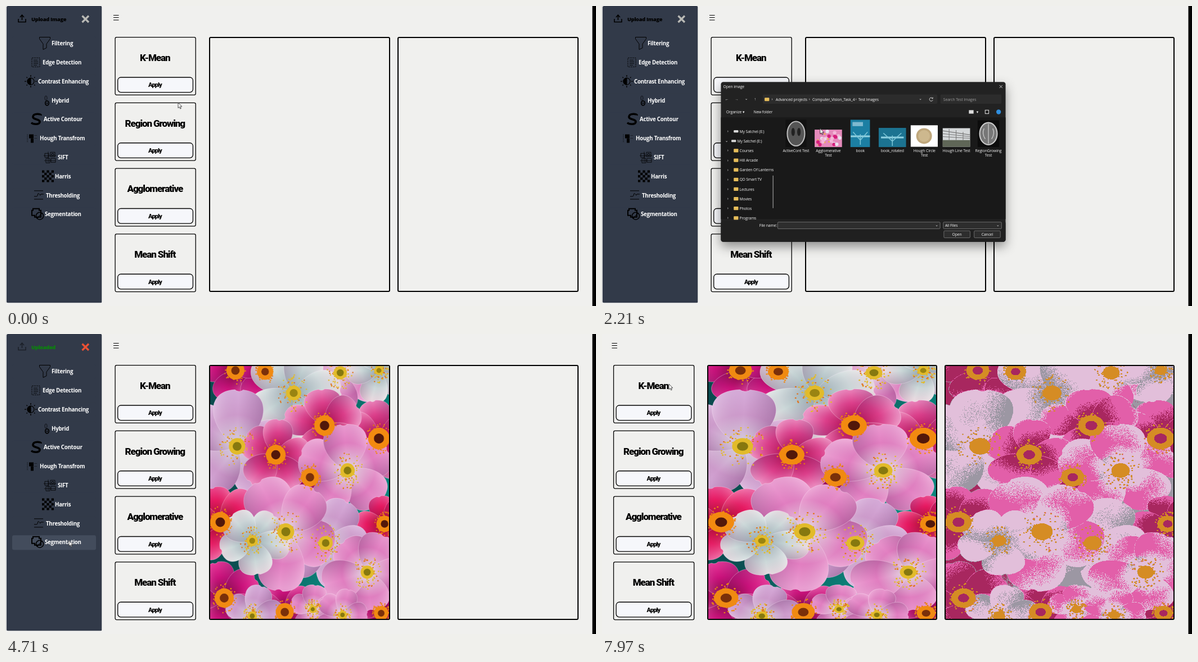
Write an HTML page with a canvas that moves like this. It is 1049 by 534 pixels and loops after 8 s.

```html
<!DOCTYPE html>
<html lang="en">
<head>
<meta charset="utf-8">
<title>Image segmentation</title>
<style>
html, body { margin: 0; width: 100%; height: 100%; overflow: hidden; background: #f0f0ee; }
#stage { position: relative; width: 1049px; height: 534px; overflow: hidden; background: #f0f0ee; }
#stage > svg { position: absolute; left: 0; top: 0; }
.panel { position: absolute; top: 55px; height: 454px; box-sizing: border-box; border: 2px solid #000; border-radius: 3px; overflow: hidden; }
.panel canvas { display: block; width: 100%; height: 100%; }
text { white-space: pre; }
.nav { font: 700 9.7px "Open Sans", "Noto Sans", sans-serif; letter-spacing: -.25px; fill: #fff; }
.up { font: 800 9.3px "Open Sans", "Noto Sans", sans-serif; letter-spacing: -.3px; }
.title { font: 900 17px Roboto, sans-serif; letter-spacing: -1.1px; }
.apply { font: 900 11px Roboto, sans-serif; letter-spacing: -.9px; }
.dlg { font: 400 6.6px "Open Sans", "Noto Sans", sans-serif; letter-spacing: -.12px; fill: #f4f4f4; }
.dim { fill: #9a9a9a; }
.mid { text-anchor: middle; }
.line { fill: none; stroke: #000; }
</style>
</head>
<body>
<div id="stage">
  <svg id="ui" width="1049" height="534"></svg>
  <div class="panel" id="left"><canvas id="photo" width="405" height="450"></canvas></div>
  <div class="panel" id="right"><canvas id="result" width="405" height="450"></canvas></div>
  <svg id="top" width="1049" height="534"></svg>
</div>
<script>
const $ = id => document.getElementById(id);
const clamp = v => Math.max(0, Math.min(1, v));
const span = (t, a, b) => clamp((t - a) / (b - a));
const show = (id, on) => { $(id).style.display = on ? '' : 'none'; };

const text = (x, y, s, cls) => `<text x="${x}" y="${y}" class="${cls}">${s}</text>`;
const rect = (x, y, w, h, fill, more = '') =>
  `<rect x="${x}" y="${y}" width="${w}" height="${h}" fill="${fill}" ${more}/>`;
const oval = (x, y, rx, ry, fill, more = '') =>
  `<ellipse cx="${x}" cy="${y}" rx="${rx}" ry="${ry}" fill="${fill}" ${more}/>`;
const path = (d, more = '') => `<path d="${d}" class="line" ${more}/>`;

function seeded(seed) {
  return () => {
    seed = (seed + 0x6D2B79F5) | 0;
    let v = Math.imul(seed ^ (seed >>> 15), 1 | seed);
    v = (v + Math.imul(v ^ (v >>> 7), 61 | v)) ^ v;
    return ((v ^ (v >>> 14)) >>> 0) / 4294967296;
  };
}

// ---- sidebar, menu and cards ----
const items = [
  // label, icon x, text x, icon
  ['Filtering', 69, 81, path('M-9.5-11H9.5V-8L3 1V8L-3 11V1L-9.5-8Z')],
  ['Edge Detection', 53, 65, path('M-7-8H7V8H-7Z', 'stroke-dasharray="3 1" stroke-width=".8"') +
    path('M-4-4H3M-4-1H4M-4 2H4M-4 5H2', 'stroke-width=".8"')],
  ['Contrast Enhancing', 44, 57, path('M0-6A6 6 0 0 1 0 6A6 6 0 0 1 0-6', 'stroke-width="1.2"') +
    path('M0-6A6 6 0 0 0 0 6Z', 'style="fill:#000"') +
    path('M0-11V-8M0 8V11M-11 0H-8M8 0H11M-7.5-7.5L-6-6M6 6L7.5 7.5M7.5-7.5L6-6M-6 6L-7.5 7.5', 'stroke-width="1.4"')],
  ['Hybrid', 72, 81, oval(1, 5, 3.2, 4, 'none', 'stroke="#000" stroke-width="1.8"') +
    oval(-1, -4, 2, 4, 'none', 'stroke="#000" stroke-width=".7"') + oval(1, 5, 1, 1.5, '#000')],
  ['Active Contour', 54, 67, path('M8-7C9-10-5-11-6-5C-7 1 7-1 6 5C5 10-6 9-9 6', 'stroke-width="3.6"')],
  ['Hough Transfrom', 45, 60, rect(-4, -7, 8, 7, '#000') + rect(-1, 0, 5, 8, '#000') +
    path('M-7-7V7M6-5H11M6 0H11', 'stroke-dasharray="1 1.5"')],
  ['SIFT', 78, 92, path('M-9-7H-2V0H-9ZM1-9H9V-1H1ZM-7 2H0V10H-7ZM2 2H10V9H2Z', 'stroke-width=".8"') +
    path('M-11-3H11M-10 6H10M-3-10V9', 'stroke-width=".7"') + oval(5, -5, 2, 2, 'none', 'stroke="#000"')],
  ['Harris', 75, 87, path('M-11-8.4H10M-11 0H10M-11 8.4H10', 'stroke-width="4.2" stroke-dasharray="4.2"') +
    path('M-6.8-4.2H10M-6.8 4.2H10', 'stroke-width="4.2" stroke-dasharray="4.2"')],
  ['Thresholding', 58, 71, path('M-8-8H8M-8 7H8M-8 2H-4C0 2-3-4 0-3S2 3 4-2H9')],
  ['Segmentation', 56, 69, path('M-8-10H3V-7H6V5H-5V2H-10V-7H-8Z', 'stroke-width="2"') +
    oval(4, 3, 6.5, 6.5, 'none', 'stroke="#000" stroke-width="1.6"') + path('M-1 8L8-2', 'stroke-width="1.2"')],
];
const itemY = i => 66.5 + 33.8 * i;

const sidebar = `<svg id="side" x="1" y="0" width="169.5" height="528.5">
  <rect width="100%" height="528.5" rx="2.5" fill="#323a49"/><g id="sideIn">
  <g id="upIcon">${path('M22 23V28.5H35V23M28.5 25V16.5M25 20L28.5 16L32 20', 'stroke-width="1.6"')}</g>
  ${text(45, 27, 'Upload Image', 'up" id="upText')}
  <path id="close" d="M135.5 17.5L147 29M147 17.5L135.5 29" stroke-width="3.2"/>
  ${items.map(([label, ix, tx, icon], i) =>
    `<rect class="hov" x="11" y="${itemY(i) - 12.5}" width="149" height="26" rx="3" fill="#323a49"/>
     <g transform="translate(${ix} ${itemY(i)})">${icon}</g>${text(tx, itemY(i) + 3.6, label, 'nav')}`).join('')}
  </g></svg>`;

const cards = ['K-Mean', 'Region Growing', 'Agglomerative', 'Mean Shift'].map((name, i) =>
  `<g transform="translate(194 ${55.5 + 116.75 * i})">
    ${rect(.1, .2, 143.1, 102.6, 'none', 'rx="2.5" stroke="#000" stroke-width="1.3"')}
    ${text(70.8, 42.4, name, 'title mid')}
    ${rect(4.7, 71.5, 133.7, 26.6, '#f6f7fb', `rx="5.5" stroke="#000" stroke-width="1.3" id="btn${i}"`)}
    ${text(71, 88.9, 'Apply', 'apply mid')}</g>`).join('');

$('ui').innerHTML = sidebar + `<g id="content">
  ${rect(184, 10, 24, 22, '#9ca5b1', 'rx="3" id="menuBg"')}
  ${rect(190, 15, 11.5, 12, '#d2cd3c', 'rx="2" id="menuFill"')}
  ${path('M191 16.5H200.5M191 20.5H200.5M191 25H200.5', 'stroke-width="1.1"')}
  ${cards}</g>` + rect(1042.5, 0, 7, 534, '#000');

// ---- file dialog ----
const folder = (x, y) => rect(x, y - 3, 8, 6, '#e6bd5a', 'rx="1"');
const rows = ['My Satchel (E:)', 'My Satchel (E:)', 'Courses', 'Hill Arcade', 'Garden Of Lanterns', 'QD Smart TV',
  'Lectures', 'Movies', 'Photos', 'Programs'];
const tree = rows.map((name, i) => {
  const y = 225 + 16.55 * i, x = i == 1 ? 248 : 252;
  const icon = i < 2 ? rect(x - 10, y - 2, 8, 4, '#d8d8d8', 'rx="1"') : folder(x - 10, y);
  return text(x - 21, y + 2, i == 1 ? '⌄' : '›', 'dlg') + icon + text(x, y + 2.5, name, 'dlg');
}).join('');

const rnd = seeded(4);
let blossoms = rect(381, 222, 47, 30, '#e58abb');
for (let i = 0; i < 26; i++) {
  const c = ['#f4b8d8', '#d61f7c', '#e9e2ee', '#eab03c'][i % 4], r = i % 4 == 3 ? 1.4 : 3;
  blossoms += oval(384 + rnd() * 41, 225 + rnd() * 24, r, r, c);
}
const stems = (x, y, w) => rect(x, y, w, 3, '#8fd0e0') +
  path(`M${x + w / 2} ${y + 16}V${y - 2}M${x + w / 2} ${y + 8}L${x + 4} ${y - 6}M${x + w / 2} ${y + 8}L${x + w - 4} ${y - 6}`,
    'style="stroke:#7cc6d8;stroke-width:1.5"');
const thumbs = [
  [349, ['ActiveCont Test'], rect(331, 205, 36, 47, '#111') +
    oval(349, 229, 15, 21, '#555', 'stroke="#bbb" stroke-width="2"') + oval(344, 226, 3, 7, '#222') + oval(354, 226, 3, 7, '#222')],
  [404.5, ['Agglomerative', 'Test'], blossoms],
  [459.5, ['book'], rect(442.5, 205, 33.5, 47, '#1c7fa3') + rect(446, 209, 18, 7, '#7fb9cf') + stems(443, 232, 33)],
  [514.5, ['book_rotated'], rect(491, 219, 47, 33, '#1c7391') + stems(495, 234, 39)],
  [569.5, ['Hough Circle', 'Test'], rect(546, 214.5, 46.5, 37, '#fff') + oval(569, 233, 13.5, 13.5, '#bfa77c') +
    oval(569, 233, 10, 10, '#cdb88e')],
  [624.5, ['Hough Line Test'], rect(601, 219.5, 47, 32, '#d5d8da') + rect(601, 240, 47, 11.5, '#5f6657') +
    path('M601 224L648 231M601 229L648 234M601 234L648 237M612 221V240M624 223V240M636 226V240', 'style="stroke:#777"')],
  [679.5, ['RegionGrowing', 'Test'], rect(661, 206, 37, 46, '#0c0c0c') +
    oval(679.5, 229, 15, 19, '#777', 'stroke="#ccc" stroke-width="2"') +
    path('M679.5 212V246M672 220Q668 229 674 238M687 220Q691 229 685 238', 'style="stroke:#ddd"')],
].map(([x, names, art]) => art + names.map((s, i) => text(x, 260.5 + 8 * i, s, 'dlg mid')).join('')).join('');

const field = (x, y, w, h) => rect(x, y, w, h, '#2d2d2d', 'rx="1.5" stroke="#858585" stroke-width=".7"');
const white = (x, y, w, h) => rect(x, y, w, h, '#fff');

$('top').innerHTML = `<defs><filter id="shade" x="-20%" y="-20%" width="140%" height="150%">
  <feDropShadow dx="0" dy="8" stdDeviation="9" flood-opacity=".42"/></filter></defs>
<g id="dialog">
  <g filter="url(#shade)">${rect(220, 140, 489, 275, '#202020', 'rx="4"')}</g>
  <g id="blank">
    ${white(220, 155.5, 489, 220.5)}${rect(222, 200.3, 93, 176, '#1c1c1c')}${rect(220, 376, 489, 36, '#303030')}
    ${white(287, 382, 28, 8)}${white(317.5, 380, 279.5, 13)}${white(603, 380, 98, 13)}
    ${white(603, 395.5, 46, 13)}${white(655, 395.5, 46, 13)}${white(701, 407, 8, 7)}
    ${rect(225, 145, 7, 5.5, '#eee')}${text(235, 150.5, 'Open image', 'dlg')}
  </g>
  <g id="files">
    ${text(224, 150.5, 'Open image', 'dlg')}
    ${rect(220, 201, 489, 175, '#191919')}
    ${rect(292, 161.5, 300, 16, '#2c2c2c', 'rx="2"')}${rect(597, 161.5, 105, 16, '#2c2c2c', 'rx="2"')}
    ${text(227, 172, '←', 'dlg')}${text(244, 172, '→', 'dlg dim')}${text(261, 171, '⌄', 'dlg')}${text(277, 172, '↑', 'dlg')}
    ${folder(295, 170)}${text(307, 172, '›', 'dlg')}${text(314, 172.3, 'Advanced projects', 'dlg')}
    ${text(371, 172, '›', 'dlg')}${text(377, 172.3, 'Computer_Vision_Task_4', 'dlg')}
    ${text(451, 172, '›', 'dlg')}${text(456, 172.3, 'Test Images', 'dlg')}
    ${text(560, 171, '⌄', 'dlg')}${path('M583.5 168A3 3 0 1 0 584 171M584 166.5V168.5H582', 'style="stroke:#eee;stroke-width:.8"')}
    ${text(602, 172.3, 'Search Test Images', 'dlg dim')}
    ${text(229, 194, 'Organize ▾', 'dlg')}${text(276, 194, 'New folder', 'dlg')}
    ${rect(646, 188.5, 8, 6, '#ddd')}${text(659, 194, '▾', 'dlg')}${rect(674, 188.5, 6, 6, 'none', 'stroke="#ddd"')}
    ${oval(697, 191.5, 4, 4, '#2f8fe0')}
    ${tree}${rect(309, 301, 1.2, 56, '#9a9a9a')}
    ${rect(378, 204, 54, 67, '#777', 'id="pick"')}${thumbs}
    ${rect(220, 379, 489, 36, '#202020', 'rx="4"')}
    ${text(286, 389, 'File name:', 'dlg')}${field(317.5, 381, 279, 11.5)}
    ${text(320, 389.3, 'Agglomerative Test', 'dlg" id="fileName')}${text(588, 388, '⌄', 'dlg')}
    ${field(602, 381, 100, 11.5)}${text(605, 389.3, 'All Files', 'dlg')}${text(693, 388, '⌄', 'dlg')}
    ${field(603, 396, 45, 12)}${text(625.5, 404.5, 'Open', 'dlg mid')}
    ${field(655, 396, 45, 12)}${text(677.5, 404.5, 'Cancel', 'dlg mid')}
  </g>
  ${path('M698.5 145.5L703.5 150.5M703.5 145.5L698.5 150.5', 'style="stroke:#eee;stroke-width:.8"')}
</g>
<path id="cursor" d="M0 0V9.6L2.2 7.6L3.8 11L5.3 10.3L3.8 7H6.8Z" fill="#fff" stroke="#222" stroke-width=".8"/>`;

// ---- flowers ----
const kinds = {
  // petal base, middle, edge, stamens, core
  m: ['#8a0a4a', '#d0107c', '#ee3a9c', '#f08a12', '#7a300a'],
  h: ['#b41055', '#e2408c', '#f59acb', '#f28a10', '#52180a'],
  r: ['#b00f34', '#ee1860', '#f5589c', '#f28a10', '#52180a'],
  l: ['#d9cfe0', '#d3a3d2', '#dcb4e0', '#e2bb2a', '#86780f'],
  k: ['#e9d0e2', '#e884c6', '#f2a6d8', '#e2bb2a', '#86780f'],
  w: ['#a5bfc0', '#d2e4e0', '#f2e6e8', '#e2bb2a', '#9a8412'],
};
// x, y, petal length, kind; later ones lie on top
const flowers = [
  [45, 8, 62, 'm'], [98, 10, 56, 'm'], [178, 198, 62, 'm'], [133, 438, 62, 'm'], [25, 413, 66, 'm'],
  [232, 12, 78, 'k'], [301, 8, 55, 'w'], [149, 48, 88, 'w'], [48, 143, 98, 'l'], [301, 129, 74, 'h'],
  [204, 106, 70, 'h'], [117, 158, 68, 'h'], [245, 186, 86, 'k'], [311, 281, 56, 'r'], [18, 278, 70, 'r'],
  [206, 315, 84, 'l'], [135, 295, 100, 'k'], [75, 311, 66, 'w'], [305, 440, 50, 'm'], [280, 367, 78, 'k'],
  [75, 445, 56, 'l'], [183, 433, 46, 'k'], [236, 443, 50, 'k'],
];

function disc(c, x, y, r, fill) {
  c.fillStyle = fill;
  c.beginPath();
  c.arc(x, y, r, 0, 7);
  c.fill();
}

function blend(gradient, ...colors) {
  colors.forEach((color, i) => gradient.addColorStop(i / (colors.length - 1), color));
  return gradient;
}

function drawPetals(c, [x, y, r, kind], rnd) {
  const turn = rnd() * 6.28;
  for (let i = 0; i < 5; i++) {
    const len = r * (.88 + rnd() * .2), w = r * (.42 + rnd() * .1), side = rnd() < .5 ? -w : w;
    c.save();
    c.translate(x, y);
    c.rotate(turn + i * 1.257 + (rnd() - .5) * .3);
    c.beginPath();
    c.moveTo(0, 0);
    c.bezierCurveTo(len * .25, -w, len * .95, -w * 1.35, len, -w * .15);
    c.quadraticCurveTo(len * .94, 0, len, w * .15);
    c.bezierCurveTo(len * .95, w * 1.35, len * .25, w, 0, 0);
    c.fillStyle = blend(c.createRadialGradient(0, 0, r * .15, 0, 0, r), ...kinds[kind].slice(0, 3));
    c.fill();
    c.fillStyle = blend(c.createLinearGradient(0, -side, 0, side),
      'rgba(80,20,80,.34)', 'rgba(120,40,110,.06)', 'rgba(255,255,255,.28)');
    c.fill();
    c.strokeStyle = 'rgba(255,235,250,.4)';
    c.lineWidth = .7;
    c.stroke();
    c.restore();
  }
}

function drawCentre(c, [x, y, r, kind], rnd) {
  const [, , , ring, core] = kinds[kind], dark = 'mhr'.includes(kind);
  for (let i = 0; i < 70; i++) {
    const a = rnd() * 6.28, d = r * (.12 + rnd() * .2);
    disc(c, x + Math.cos(a) * d, y + Math.sin(a) * d * 1.25, 1.2, i % 3 ? ring : '#e2711a');
  }
  disc(c, x, y, r * (dark ? .26 : .15), ring);
  disc(c, x, y, r * (dark ? .12 : .08), core);
}

function paintPhoto() {
  const c = $('photo').getContext('2d'), rnd = seeded(11);
  c.scale(405 / 319, 1);
  c.fillStyle = blend(c.createLinearGradient(0, 0, 319, 120), '#0a4a4e', '#0b4f52', '#0b857c');
  c.fillRect(0, 0, 319, 450);
  flowers.forEach(f => drawPetals(c, f, rnd));
  flowers.forEach(f => drawCentre(c, f, rnd));
}

// each pixel takes the nearest of five cluster colours
function paintClusters() {
  const means = [[226, 191, 218], [156, 151, 163], [226, 95, 169], [168, 39, 95], [213, 140, 36]];
  const img = $('photo').getContext('2d').getImageData(0, 0, 405, 450), d = img.data, rnd = seeded(5);
  for (let i = 0; i < d.length; i += 4) {
    const n = (rnd() - .5) * 28;
    let best = 1e9, pick;
    for (const m of means) {
      const e = (d[i] + n - m[0]) ** 2 + (d[i + 1] + n - m[1]) ** 2 + (d[i + 2] + n - m[2]) ** 2;
      if (e < best) { best = e; pick = m; }
    }
    d.set(pick, i);
  }
  $('result').getContext('2d').putImageData(img, 0, 0);
}
paintPhoto();
paintClusters();

// ---- timeline ----
const moves = [
  // ms, x, y
  [20, 306, 172], [160, 323, 158], [810, 62, 20], [900, 62, 20], [1460, 288, 137], [1720, 288, 137],
  [2400, 411, 237], [3260, 411, 237], [3510, 229, 288], [3590, 182, 301], [3960, 112, 368], [4710, 112, 368],
  [5380, 195, 20], [5680, 195, 20], [6170, 124, 136], [6830, 124, 136], [7190, 107, 104], [7420, 107, 104], [7960, 119, 89],
];
function pointer(t) {
  const i = moves.findIndex(m => m[0] > t);
  if (i < 1) return moves[i ? moves.length - 1 : 0].slice(1);
  const a = moves[i - 1], b = moves[i], p = span(t, a[0], b[0]), e = p * p * (3 - 2 * p);
  return [a[1] + (b[1] - a[1]) * e, a[2] + (b[2] - a[2]) * e];
}
const inOut = p => p < .5 ? 4 * p ** 3 : 1 - (2 - 2 * p) ** 3 / 2;
const hovers = [...document.querySelectorAll('.hov')];

function render(t) {
  const [x, y] = pointer(t);
  $('cursor').setAttribute('transform', `translate(${x} ${y})`);

  const fold = inOut(span(t, 5560, 5960)), shift = 173.5 * fold, width = 169.5 * (1 - fold);
  $('side').setAttribute('width', width);
  $('sideIn').setAttribute('transform', `translate(${(width - 169.5) / 2 - 1} 0)`);
  $('content').setAttribute('transform', `translate(${-shift} 0)`);
  $('left').style.left = 360.5 - shift + 'px';
  $('left').style.width = 322 + shift / 2 + 'px';
  $('right').style.left = 695.5 - shift / 2 + 'px';
  $('right').style.width = 322.5 + shift / 2 + 'px';

  hovers.forEach((h, i) => {
    const on = shift == 0 && x > 11 && x < 160 && Math.abs(y - itemY(i)) < 13;
    h.setAttribute('fill', on ? '#434c5c' : '#323a49');
  });
  const onMenu = Math.abs(x - 196 + shift) < 12 && y < 32;
  show('menuBg', onMenu);
  show('menuFill', onMenu);
  $('btn0').setAttribute('fill', t >= 6500 && t < 6570 ? '#c9c9d2' : t > 6130 && t < 7400 ? '#d9d8df' : '#f6f7fb');

  const loaded = t >= 3230;
  $('upText').textContent = loaded ? 'Uploaded' : 'Upload Image';
  $('upText').setAttribute('fill', loaded ? '#0a870a' : '#000');
  $('upIcon').setAttribute('opacity', loaded ? .45 : 1);
  $('close').setAttribute('stroke', loaded ? '#ea5034' : '#b9b9b5');
  show('photo', loaded);
  show('result', t >= 7390);

  const opening = t < 2500, p = opening ? span(t, 1380, 1550) : 1 - span(t, 3040, 3170);
  const k = opening ? .865 + .17 * p : .979 + .056 * p;
  show('dialog', p > 0);
  $('dialog').setAttribute('opacity', p);
  $('dialog').setAttribute('transform', `translate(464.5 277.5) scale(${k}) translate(-464.5 -277.5)`);
  show('blank', t < 1700);
  show('files', t >= 1700);
  show('pick', t >= 2260);
  $('pick').setAttribute('fill', t < 2450 ? '#4d4d4d' : '#777');
  show('fileName', t >= 2450);
}

const start = performance.now();
function tick() {
  render((performance.now() - start) % 8000);
  requestAnimationFrame(tick);
}
tick();
</script>
</body>
</html>
```
